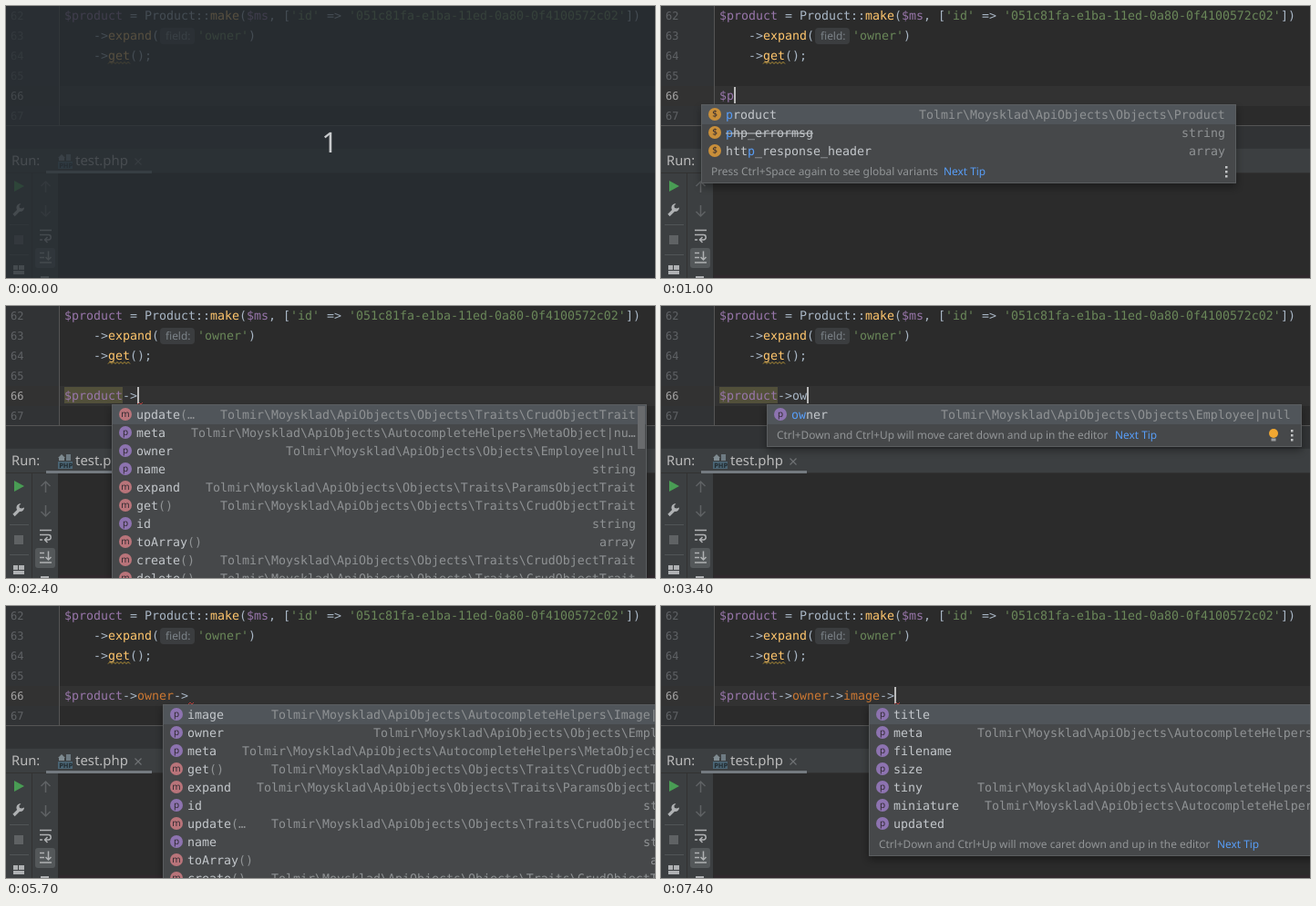
These frames come from a looping animation (712 by 299 pixels, 8000 ms). An HTML page:

```html
<!DOCTYPE html>
<html lang="en">
<head>
<meta charset="utf-8">
<title>Code completion</title>
<style>
  html, body { margin: 0; width: 100%; height: 100%; overflow: hidden; background: #2b2b2b; }
  svg { display: block; width: 712px; height: 299px; }
  text { white-space: pre; text-rendering: geometricPrecision; }
  .code { font: 13.29px "DejaVu Sans Mono", monospace; }
  .ui { font-family: "Noto Sans", sans-serif; }
  .num { font: 12px "DejaVu Sans Mono", monospace; }
  .hint { font-size: 11.9px; }
</style>
</head>
<body>
<svg id="stage" viewBox="0 0 712 299" xmlns="http://www.w3.org/2000/svg">
  <defs>
    <filter id="soft" x="-10%" y="-30%" width="120%" height="160%"><feGaussianBlur stdDeviation="4"/></filter>
  </defs>
  <g id="editor"></g>
  <g id="panel"></g>
  <g id="line"></g>
  <g id="popup"></g>
  <g id="cover"></g>
</svg>
<script>
const LOOP = 8000, CELL = 8, LEFT = 64;
const C = {
  text: '#a9b7c6', variable: '#9876aa', method: '#ffc66d', string: '#6a8759',
  keyword: '#cc7832', error: '#bc3f3c', icon: '#afb1b3', off: '#5f6264', bar: '#3c3f41'
};
const $ = id => document.getElementById(id);
const esc = s => s.replace(/&/g, '&amp;').replace(/</g, '&lt;').replace(/>/g, '&gt;');
const rect = (x, y, w, h, fill, extra = '') =>
  `<rect x="${x}" y="${y}" width="${w}" height="${h}" fill="${fill}" ${extra}/>`;
const text = (x, y, s, fill, cls = 'code', extra = '') =>
  `<text x="${x}" y="${y}" fill="${fill}" class="${cls}" ${extra}>${esc(s)}</text>`;
const stroke = (d, color, w = 1.5) =>
  `<path d="${d}" fill="none" stroke="${color}" stroke-width="${w}"/>`;

// Lays [string, colour, attributes] runs on the character grid.
function code(x, y, runs) {
  return runs.map(([s, color, extra]) => {
    const out = text(x, y, s, color, 'code', extra);
    x += s.length * CELL;
    return out;
  }).join('');
}

function wave(x, y, w, color) {
  let d = `M${x} ${y + 2}`;
  for (let i = 2; i <= w; i += 2) d += `L${x + i} ${i % 4 ? y : y + 2}`;
  return stroke(d, color, 1);
}

function drawEditor() {
  let s = rect(0, 0, 712, 132, '#2b2b2b') + rect(0, 0, 58, 132, '#313335') +
    rect(0, 88, 712, 22, '#323232') + rect(58, 0, 1, 131, '#555555');
  for (let n = 62; n < 68; n++)
    s += text(5, 15 + (n - 62) * 22, String(n), n === 66 ? '#a4a3a3' : '#606366', 'num');
  s += code(LEFT, 15, [
    ['$product', C.variable], [' = Product::', C.text], ['make', C.method, 'font-style="italic"'],
    ['(', C.text], ['$ms', C.variable], [', [', C.text], ["'id'", C.string], [' => ', C.text],
    ["'051c81fa-e1ba-11ed-0a80-0f4100572c02'", C.string], ['])', C.text]
  ]);
  s += code(96, 37, [['->', C.text], ['expand', C.method], ['(', C.text]]);
  s += rect(169, 24, 38, 18, '#3b3d3f', 'rx="4"') + text(175, 36.5, 'field:', '#7c8389', 'ui hint');
  s += code(210, 37, [["'owner'", C.string], [')', C.text]]);
  s += code(96, 59, [['->', C.text], ['get', C.method], ['();', C.text]]);
  return s + wave(112, 61.5, 24, '#b89537');
}

function drawPanel() {
  const up = (y, k) => stroke(`M43.5 ${y - 6 * k}V${y + 6 * k}M38.5 ${y - k}L43.5 ${y - 6 * k}L48.5 ${y - k}`, C.off);
  let s = rect(0, 131, 712, 26, '#313335') + rect(0, 131, 712, 1, '#555555') +
    rect(0, 157, 712, 27, C.bar) + rect(0, 156, 712, 1, '#323537') +
    rect(0, 184, 712, 115, '#2b2b2b') + rect(0, 184, 57, 115, C.bar) +
    rect(0, 183, 712, 1, '#323232') + rect(28, 184, 1, 115, '#323232') +
    rect(58, 296, 654, 3, '#30292d');
  s += text(6, 175, 'Run:', '#bbbbbb', 'ui', 'font-size="14.7"') +
    text(76, 175, 'test.php', '#bbbbbb', 'ui', 'font-size="14.9"') +
    rect(44, 181, 116, 3, '#747a80') +
    stroke('M141.5 167.5l7 7m0-7l-7 7', '#707375', 1.1);
  // Tab icon
  s += `<path d="M57 167l4-4 4 4h-1v3h-6v-3z" fill="#7f8b91"/>` + rect(66, 163, 5, 7, '#6e7b83') +
    rect(57, 171, 16, 8, '#4a6473') +
    text(58.2, 178, 'PHP', '#20292e', 'ui', 'font-size="7.4" font-weight="700"');
  // Left column
  s += `<path d="M9 192l11 6-11 6z" fill="#499c54"/>` +
    stroke('M8.5 230L15 223.5', C.icon, 3.2) +
    `<path d="M20 221.5a4.3 4.3 0 1 1-3.6-4.1l-2 2.1.5 2.5 2.4.5z" fill="${C.icon}"/>` +
    rect(4, 240, 21, 1, '#515557') + rect(9, 252, 10, 10, C.off) + rect(4, 273, 21, 1, '#515557') +
    rect(8, 285, 5, 5, C.icon) + rect(14, 285, 6, 5, C.icon) + rect(8, 291, 12, 4, C.icon);
  // Right column
  s += up(199, 1) + up(225, -1) +
    stroke('M37 246.5H50M37 251.5H46.5a2.7 2.7 0 0 1 0 5.4H43M45.5 254l-3 3 3 3M37 257H40', C.icon) +
    rect(32, 266, 22, 22, '#54585a', 'rx="3"') +
    stroke('M37 271.5H42M37 276.5H42M37 282H50M46.5 269.5V279M43.5 276l3 3 3-3', C.icon) +
    rect(38, 297, 9, 2, C.icon);
  return s;
}

const NS = 'Tolmir\\Moysklad\\ApiObjects\\', OBJ = NS + 'Objects\\', HELP = NS + 'AutocompleteHelpers\\';
const CRUD = OBJ + 'Traits\\CrudObjectTrait', PARAMS = OBJ + 'Traits\\ParamsObjectTrait';
const META = HELP + 'MetaObject|nu…', STR = 'string';

// Row: icon, name, grey tail, type
const product = ['$', 'product', '', OBJ + 'Product'];
const phpError = ['$', 'php_errormsg', '', STR];
const header = ['$', 'http_response_header', '', 'array'];
const update = ['m', 'update', '(…', CRUD], get = ['m', 'get', '()', CRUD], create = ['m', 'create', '()', CRUD];
const expand = ['m', 'expand', '', PARAMS], toArray = ['m', 'toArray', '()', 'array'];
const str = name => ['p', name, '', STR];
const owner = ['p', 'owner', '', OBJ + 'Employee|null'];

const LISTS = {
  vars: [product, ['$', 'ms', '', 'Tolmir\\Moysklad\\MoySklad'],
    ...['_GET', '_POST', '_COOKIE', '_FILES', '_SERVER', '_ENV', '_REQUEST', '_SESSION'].map(n => ['$', n, '', 'array'])],
  p: [product, phpError, header],
  pro: [product],
  fields: [update, ['p', 'meta', '', META], owner, str('name'), expand, get, str('id'), toArray, create,
    ['m', 'delete', '()', CRUD]],
  o: [owner, toArray, ...['code', 'country', 'volume', 'description', 'externalCode', 'productFolder',
    'modifications', 'barcodes'].map(str)],
  ow: [owner],
  employee: [['p', 'image', '', HELP + 'Image|null'], ['p', 'owner', '', OBJ + 'Employee'],
    ['p', 'meta', '', META], get, expand, str('id'), update, str('name'), toArray, create],
  image: [['p', 'title', '', ''], ['p', 'meta', '', HELP + 'MetaObject'], ['p', 'filename', '', ''],
    ['p', 'size', '', ''], ['p', 'tiny', '', HELP + 'MetaObject'], ['p', 'miniature', '', HELP + 'MiniImage'],
    ['p', 'updated', '', '']]
};
const DISC = { m: '#b9747a', p: '#8d73b0', $: '#c98f3a' };
const TIP = 'Ctrl+Down and Ctrl+Up will move caret down and up in the editor';

function label(x, y, name, typed, struck) {
  let k = 0;
  const runs = [...name].map(ch => {
    const hit = k < typed.length && ch === typed[k];
    if (hit) k++;
    return [ch, hit ? '#589df6' : '#c3c7cb'];
  });
  return code(x, y, runs) + (struck ? rect(x, y - 4.5, name.length * CELL, 1, '#c3c7cb') : '');
}

function drawPopup({ x, list, typed = '', tip, link, bulb }) {
  const rows = LISTS[list], w = 587, h = rows.length * 20 + (tip ? 27 : 40);
  let s = rect(x, 112, w, h, '#000', 'opacity=".35" filter="url(#soft)"') +
    rect(x + .5, 108.5, w - 1, h - 1, '#46484a', 'stroke="#5a5d5f"') +
    rect(x + 1, 109, w - 2, 21, '#50555a');
  rows.forEach(([icon, name, tail, type], i) => {
    const y = 124 + i * 20;
    s += `<circle cx="${x + 15}" cy="${y - 5}" r="7" fill="${DISC[icon]}"/>` +
      text(x + 15, y - 1.6, icon, '#302a30', 'ui', 'font-size="10" text-anchor="middle"') +
      label(x + 27, y, name, typed, name === 'php_errormsg') +
      text(x + 27 + name.length * CELL, y, tail, '#8f9294') +
      text(x + w - 12 - type.length * CELL, y, type, '#8f9294');
  });
  if (!tip) return s + rect(x + w - 10, 110, 8, 47, '#696b6d');
  const y = 126 + rows.length * 20;
  s += text(x + 11, y, tip, '#929597', 'ui hint') + text(x + link, y, 'Next Tip', '#589df6', 'ui hint');
  for (const dy of [-9, -4, 1]) s += rect(x + 575, y + dy - 1, 2.5, 2.5, '#c3c5c7');
  if (bulb) s += `<circle cx="${x + 556}" cy="${y - 6}" r="5" fill="#f0a732"/>` + rect(x + 553.5, y - .5, 5, 3, '#9b9da0');
  return s;
}

const first = { x: 44, tip: 'Press Ctrl+Space again to see global variants', link: 266 };
const V = ['$product', C.variable], A = ['->', C.text], DASH = ['-', C.text];
const word = (s, color) => [s, color];
const O = word('owner', C.keyword);

// Each step holds until the next; mark: 1 = usages, 2 = unused value; err = column of the error wave.
const STEPS = [
  { at: 0, runs: [], hide: true, cover: true },
  { at: 100, runs: [], hide: true },
  { at: 300, runs: [] },
  { at: 600, runs: [word('$', C.text)] },
  { at: 700, runs: [word('$', C.text)], popup: { x: 44, list: 'vars' } },
  { at: 1000, runs: [word('$p', C.variable)], popup: { ...first, list: 'p', typed: 'p' } },
  { at: 1200, runs: [word('$pr', C.variable)], popup: { ...first, list: 'p', typed: 'pr' } },
  { at: 1300, runs: [word('$pro', C.variable)], popup: { ...first, list: 'pro', typed: 'pro' } },
  { at: 1600, runs: [V] },
  { at: 1700, runs: [V], mark: 1 },
  { at: 1900, runs: [V], mark: 1, err: 8 },
  { at: 2100, runs: [V, DASH], mark: 2, err: 9 },
  { at: 2300, runs: [V, A], mark: 2, err: 10 },
  { at: 2400, runs: [V, A], mark: 2, err: 10, popup: { x: 116, list: 'fields' } },
  { at: 3000, runs: [V, A, word('o', C.text)], mark: 2, popup: { x: 116, list: 'o', typed: 'o' } },
  { at: 3400, runs: [V, A, word('ow', C.text)], mark: 2,
    popup: { x: 116, list: 'ow', typed: 'ow', tip: TIP, link: 382, bulb: true } },
  { at: 4100, runs: [V, A, word('owner', C.text)], mark: 2 },
  { at: 4400, runs: [V, A, word('owner', C.variable)] },
  { at: 4600, runs: [V, A, O, DASH], err: 16 },
  { at: 5000, runs: [V, A, O, A], err: 17, popup: { x: 172, list: 'employee' } },
  { at: 5700, runs: [V, A, O, A], err: 17, hide: true, popup: { x: 172, list: 'employee' } },
  { at: 6300, runs: [V, A, O, A, word('image', C.text)] },
  { at: 6600, runs: [V, A, O, A, word('image', C.variable)] },
  { at: 7000, runs: [V, A, O, A, word('image', C.keyword), DASH], err: 23 },
  { at: 7300, runs: [V, A, O, A, word('image', C.keyword), A], err: 24 },
  { at: 7400, runs: [V, A, O, A, word('image', C.keyword), A], err: 24,
    popup: { x: 228, list: 'image', tip: TIP, link: 382 } }
];

function drawLine({ runs, mark, err, hide }) {
  const end = LEFT + CELL * runs.reduce((n, r) => n + r[0].length, 0);
  let s = '';
  if (mark === 1) s += rect(64, 2, 64, 18, '#40332b') + code(LEFT, 15, [V]) + rect(64, 89, 64, 18, '#344134');
  if (mark === 2) s += rect(64, 89, 64, 18, '#52503a');
  s += code(LEFT, 103, runs);
  if (err) s += wave(LEFT + err * CELL, 106, 6, C.error);
  return s + (hide ? '' : rect(end, 89, 2, 18, '#bbbbbb'));
}

let shown = null;
function render(t) {
  const step = STEPS.filter(s => s.at <= t).pop();
  if (step === shown) return;
  shown = step;
  $('line').innerHTML = drawLine(step);
  $('popup').innerHTML = step.popup ? drawPopup(step.popup) : '';
  $('cover').innerHTML = step.cover
    ? rect(0, 0, 712, 299, '#272d32', 'opacity=".78"') +
      text(355, 160.5, '1', '#c8cacc', 'ui', 'font-size="31" text-anchor="middle"')
    : '';
}

$('editor').innerHTML = drawEditor();
$('panel').innerHTML = drawPanel();
const start = performance.now();
function tick() {
  render((performance.now() - start) % LOOP);
  requestAnimationFrame(tick);
}
tick();
</script>
</body>
</html>
```
